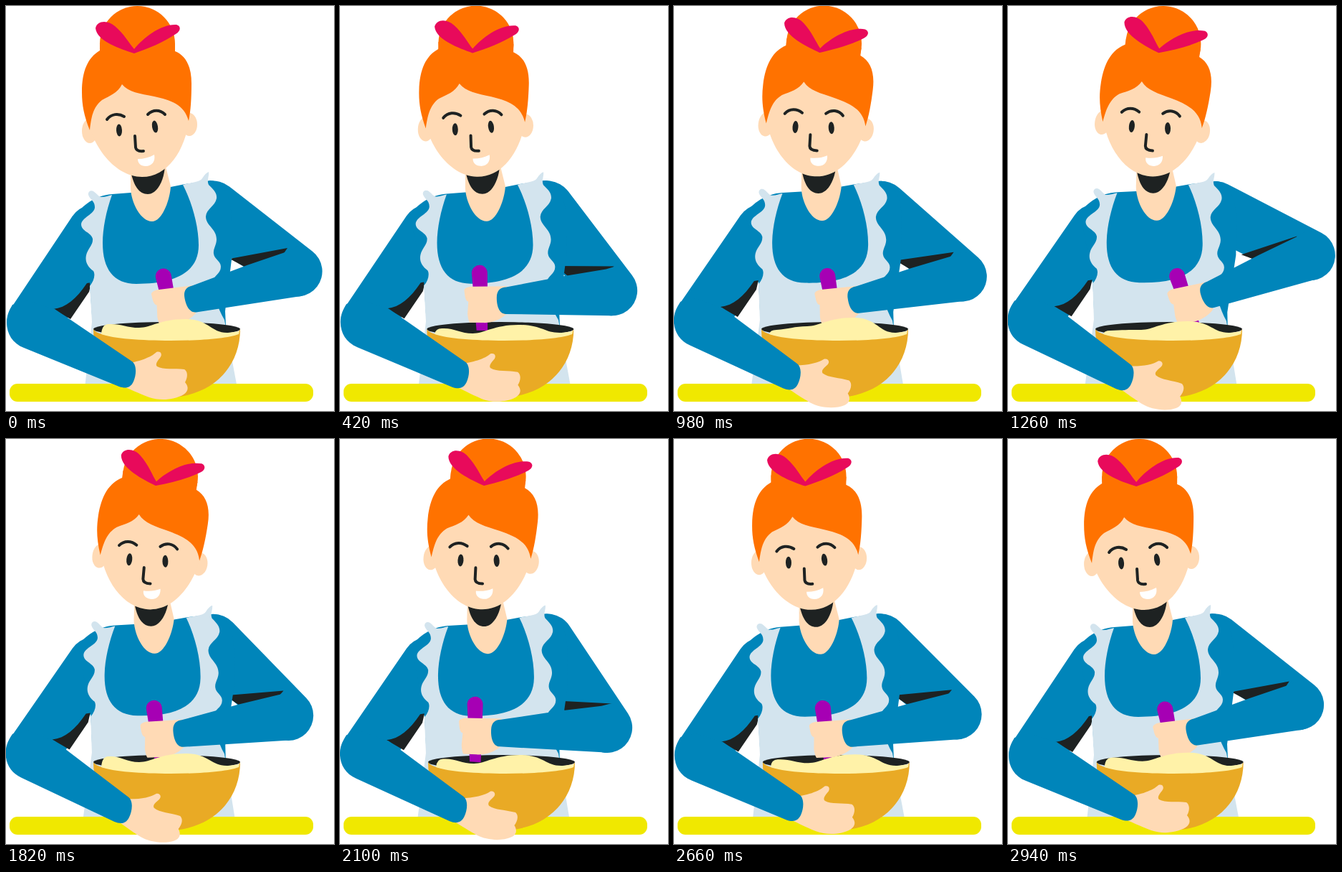
Recreate the animation shown at these times as an HTML page. Size 458 by 564 pixels, loop 3.01 s.

```html
<!DOCTYPE html>
<html lang="en">
<head>
<meta charset="utf-8">
<title>Stirring the bowl</title>
<style>
  html, body { margin: 0; width: 100%; height: 100%; overflow: hidden; background: #fff; }
  svg { display: block; width: 100vw; height: 100vh; }
  .skin { fill: #ffdab5; }
  .blue { fill: #0085ba; }
  .dark { fill: #1e2222; }
  .hair { fill: #ff7200; }
  .cloth { fill: #d3e4ee; }
  .ribbon { fill: #e80a5b; }
  .sleeve { stroke: #0085ba; stroke-width: 73; stroke-linecap: round; }
  .line { fill: none; stroke: #1e2222; stroke-width: 4; stroke-linecap: round; stroke-linejoin: round; }
</style>
</head>
<body>
<svg viewBox="0 0 458 564">
  <line id="upperL" class="sleeve"/>
  <path id="creaseL" class="dark" d="M66 422C84 420 98 408 113 386L119 385L116 398L90 436Z"/>
  <path id="upperR" class="blue" d="M0 -36L147 -35A35 35 0 0 1 147 35L75 41H0A38.5 38.5 0 0 1 0 -36Z"/>
  <path id="creaseR" class="dark" d="M0 0H-82L-52 24L-8 8Z"/>

  <g id="torso">
    <path class="blue" d="M148 262L174 260L230 252L250 248L285 243C302 243 315 262 315 300L316 345L306 425L307 445H121L117 386L97 292C106 278 124 264 148 262Z"/>
    <path class="cloth" d="M148 263C140 285 135 310 135 330C135 366 150 387 182 387C238 387 269 370 269 333C269 305 259 272 247 249
      C262 245 271 245 274 240C277 235 280 232 283 231C284 237 280 243 283 249C289 255 295 260 294 268C292 279 280 282 279 293
      C279 306 294 310 294 325C294 333 289 338 290 345C291 353 300 355 300 363C300 373 290 375 288 385C290 402 295 420 305 437
      L323 532H110L120 440L117 390C123 383 125 374 122 369C114 363 110 356 112 347C114 338 122 333 121 324C119 315 105 314 105 304
      C106 294 124 290 124 280C124 271 117 270 115 263C114 259 118 256 122 258C127 261 130 267 134 266C139 266 143 264 148 263Z"/>
    <path class="skin" d="M174 225L174 250C173 270 187 300 204 300C218 300 229 270 230 251L222 220Z"/>
    <path class="dark" d="M175 234C179 251 186 262 198 262C211 262 221 243 222 222Z"/>
  </g>

  <rect x="5" y="526" width="424" height="25" rx="11" fill="#f0e800"/>

  <g id="head">
    <ellipse class="skin" cx="117" cy="174" rx="11" ry="17"/>
    <ellipse class="skin" cx="256" cy="165" rx="11" ry="16"/>
    <path class="skin" d="M112 140C114 190 150 238 190 238C231 238 259 189 257 130L180 90Z"/>
    <circle class="hair" cx="183.5" cy="52.5" r="52.5"/>
    <path class="hair" d="M131 52V62C114 72 106 91 106 120C106 138 109 153 117 173C119 156 121 141 134 131C145 125 156 121 162 109C171 120 187 122 207 126C230 131 249 137 255 160C258 146 259 128 259 108C259 84 251 69 236 63V52Z"/>
    <path class="ribbon" d="M179 66C160 60 127 49 125 31C127 20 142 19 152 28C165 39 172 52 179 60C192 44 216 25 238 26C245 28 244 35 237 39C219 51 199 59 179 66Z"/>
    <ellipse class="dark" cx="158" cy="173" rx="4" ry="8.5" transform="rotate(-3 158 173)"/>
    <ellipse class="dark" cx="208" cy="168" rx="4" ry="8.5" transform="rotate(-10 208 168)"/>
    <path id="brows" class="line" d="M141 158C147 150 157 149 165 154M198 151C205 144 215 144 222 151"/>
    <path class="line" d="M180 181L181 197Q182 203 192 202"/>
    <path fill="#fff" d="M184 213C192 213 200 211 207 207C209 216 204 223 195 223C188 223 184 219 184 213Z"/>
  </g>

  <ellipse id="inside" class="dark" cx="224.5" cy="450" rx="102.5" ry="10"/>
  <path id="spoon" fill="#a600b4" d="M-37 -35A11 11 0 0 1 -15 -35L-13.5 45H-29Z"/>
  <path id="handR" class="skin" d="M12 -17L-38 -16Q-46 -15 -47 -11C-46 -5 -46 4 -41 5L-42 22Q-41 31 -39 34H-21C-10 35 4 30 12 22Z"/>
  <path id="foreR" class="blue" d="M0 35H-148C-158 35 -161 22 -161 12C-161 2 -156 -2 -148 -2.5L-68 -19L-9 -29.5L5 -34A35 35 0 0 1 0 35Z"/>
  <g id="bowl">
    <path fill="#e9aa25" d="M122 450Q126 457 150 460Q225 469 300 460Q325 457 327 450C327 505 285 545 225 545C165 545 122 505 122 450Z"/>
    <path id="dough" fill="#fff2a8"/>
  </g>

  <g id="lowerL">
    <path id="handL" class="skin" d="M165 498C185 496 203 489 210 482C216 480 219 485 215 490C211 495 208 499 211 502C220 507 235 504 249 506C255 510 253 519 250 524C256 531 254 537 248 541C235 549 214 550 200 545C184 539 172 533 160 528Z"/>
    <path class="blue" d="M68 422L176 495C183 500 182 514 178 523C174 532 167 533 158 530L25 476C9 470 1 456 1 441C1 430 5 423 9 416L30 410Z"/>
  </g>
</svg>
<script>
const LOOP = 3010, STEP = 70, RAD = Math.PI / 180;
const el = {};
document.querySelectorAll('[id]').forEach(n => el[n.id] = n);

const linear = u => u;
const sine = u => (1 - Math.cos(Math.PI * u)) / 2;

// keys: [time, value] pairs
function track(keys, t, ease) {
  let i = 1;
  while (i < keys.length - 1 && t > keys[i][0]) i++;
  const [t0, v0] = keys[i - 1], [t1, v1] = keys[i];
  return v0 + (v1 - v0) * ease((t - t0) / (t1 - t0));
}

const armKeys = [[0, 37.5], [620, 56.8], [1318, 26.5], [2180, 56.5], [LOOP, 37.5]];
const peakKeys = [[0, 436], [420, 444], [980, 434], [1260, 439], [1820, 438], [2380, 442], [LOOP, 436]];
const bumpKeys = [[0, 443], [420, 449], [1260, 452], [1820, 442], [2380, 449], [LOOP, 443]];
const bowlKeys = [[0, 0], [420, -.7], [980, 0], [1820, 0], [2380, 2], [2940, 1.7], [LOOP, .3]];

function move(node, x, y, angle = 0, px = 0, py = 0) {
  node.setAttribute('transform', `translate(${x} ${y}) rotate(${angle} ${px} ${py})`);
}
function join(node, x1, y1, x2, y2) {
  Object.entries({ x1, y1, x2, y2 }).forEach(([k, v]) => node.setAttribute(k, v));
}

function body(sway) {
  move(el.head, 0, 0, 9.6 * sway, 200, 265);
  move(el.brows, 0, -2.5 * sway);
  move(el.torso, sway, -sway, 1.6 * sway, 215, 400);
  const dx = -1.5 * sway, dy = -4 * sway;
  join(el.upperL, 123, 313 - sway, 38 + dx, 440 + dy);
  move(el.creaseL, dx, dy);
  move(el.lowerL, dx, dy, 3.6 * sway, 38, 440);
  move(el.handL, 0, 0, 9 * sway, 172, 513);
}

function stir(a, sway) {
  const ex = 290 + 147 * Math.cos(a * RAD), ey = 280 + 147 * Math.sin(a * RAD);
  const d = a - 37.5, tilt = -8.7 + .65 * d;
  const c = Math.cos(tilt * RAD), s = Math.sin(tilt * RAD);
  const wx = ex - 161 * c - 12 * s + 1.5, wy = ey - 161 * s + 12 * c + 1.5;
  move(el.upperR, 290 + sway, 280 + sway / 2, a);
  move(el.creaseR, 393 - (d < 0 ? 1 : .7) * d, 337 + (d < 0 ? 1.58 : 1.72) * d, -10.6 + .74 * d);
  move(el.foreR, ex, ey, tilt);
  move(el.handR, wx, wy, tilt * .7);
  move(el.spoon, wx, wy, tilt);
}

function fill(t) {
  const p = track(peakKeys, t, linear), b = track(bumpKeys, t, linear), dip = p + 12;
  el.dough.setAttribute('d', `M133 457Q134 ${b} 143 ${b}C160 ${b - 1} 168 ${dip} 186 ${dip}` +
    `C202 ${dip} 216 ${p} 250 ${p}C284 ${p} 286 456 310 455Q318 454 326 453L325 457C295 469 165 469 133 457Z`);
  const x = track(bowlKeys, t, linear);
  move(el.bowl, x, 0);
  move(el.inside, x, 0);
}

const start = performance.now();
function draw() {
  const t = Math.floor(((performance.now() - start) % LOOP) / STEP) * STEP;
  const sway = sine(2 * t / LOOP);
  body(sway);
  stir(track(armKeys, t, sine), sway);
  fill(t);
  requestAnimationFrame(draw);
}
draw();
</script>
</body>
</html>
```
